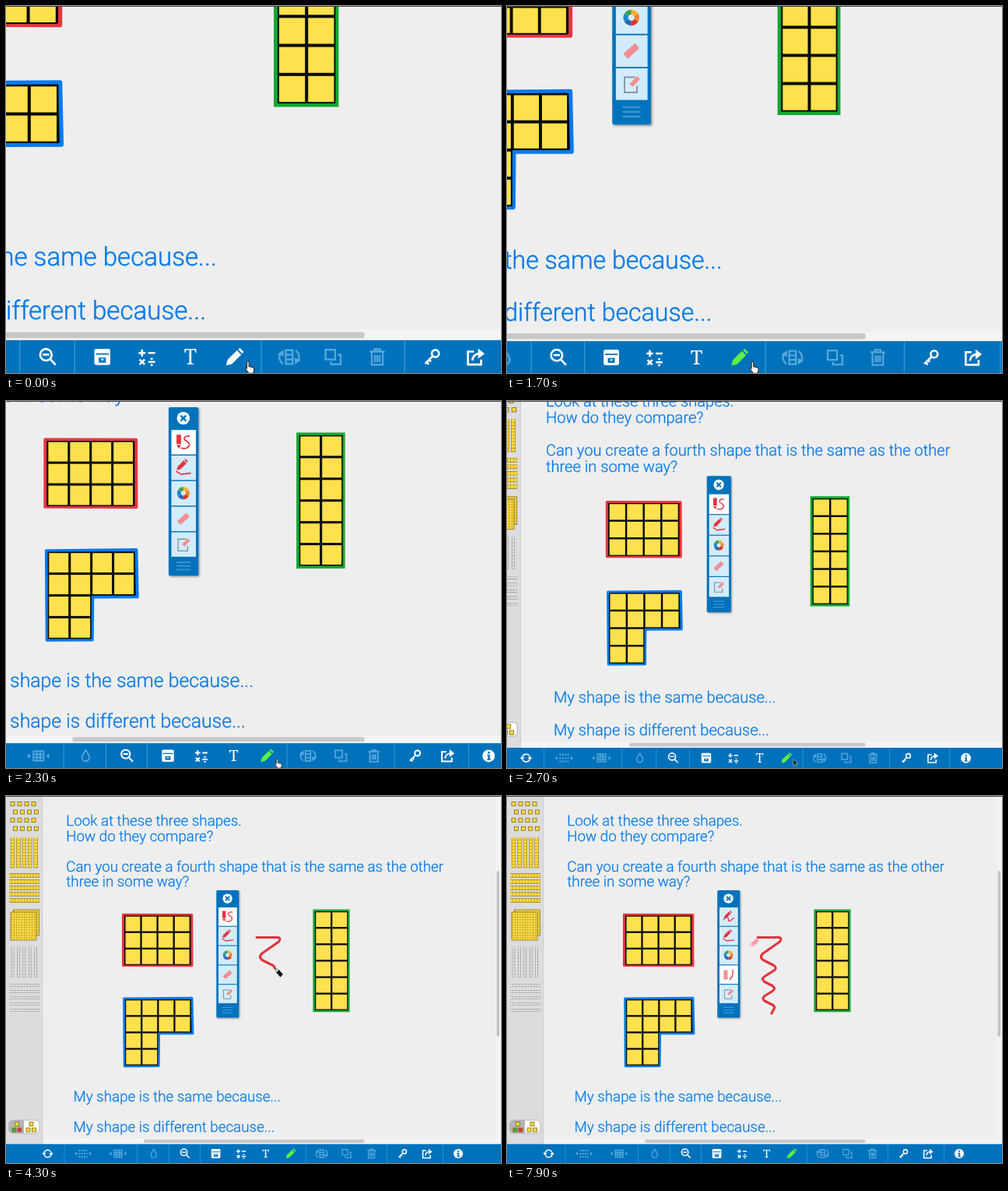
An HTML page for the animation above (8 s loop, 636 by 471 pixels).

```html
<!DOCTYPE html>
<html lang="en">
<head>
<meta charset="utf-8">
<title>Shape whiteboard</title>
<style>
  html, body { margin: 0; width: 100%; height: 100%; overflow: hidden; background: #eee; }
  svg { display: block; width: 636px; height: 471px; }
  .copy { font: 300 18.75px Roboto, sans-serif; fill: #0078ea; stroke: #0078ea; stroke-width: .25; text-rendering: geometricPrecision; }
  .line { fill: none; stroke: #fff; stroke-width: 1.5; }
  .solid { fill: #fff; }
  .dim .line { stroke: #58a8dc; stroke-width: 1.3; }
  .dim .solid { fill: #58a8dc; }
  .red { fill: #e3343f; }
  .redline { fill: none; stroke: #e3343f; stroke-width: 1.3; stroke-linecap: round; stroke-linejoin: round; }
  .pink { fill: #f58e94; }
</style>
</head>
<body>
<svg viewBox="0 0 636 471">
  <defs>
    <pattern id="mesh" width="3.3" height="3.3" patternUnits="userSpaceOnUse">
      <rect width="3.3" height="3.3" fill="#ffdf45"/>
      <path d="M0 0H3.3M0 0V3.3" stroke="#a58a1c" stroke-width=".9"/>
    </pattern>
    <filter id="shade" x="-20%" y="-5%" width="150%" height="115%">
      <feDropShadow dx="1" dy="1" stdDeviation="1" flood-opacity=".4"/>
    </filter>
    <path id="pencil" d="M-5.9 5.9l1-4.1 7-7 3.2 3.2-7 7zM2.9-5.9l.8-.7q.5-.3 1 0l2 2q.4.6 0 1l-.7.8z"/>
  </defs>

  <g id="world">
    <rect x="629" width="8" height="447" fill="#f3f3f4"/>
    <rect x="47" y="439.4" width="590" height="9" fill="#f4f4f5"/>
    <rect x="177" y="440.8" width="283.5" height="4.4" rx="2" fill="#c8c8c8"/>
    <rect x="630.3" y="96" width="3.8" height="213" rx="1.9" fill="#c6c6c6"/>

    <g id="side"></g>

    <g class="copy">
      <text x="77.3" y="38">Look at these three shapes.</text>
      <text x="77.3" y="57.5">How do they compare?</text>
      <text x="77.3" y="96.5">Can you create a fourth shape that is the same as the other</text>
      <text x="77.3" y="116">three in some way?</text>
      <text x="86.6" y="392.3">My shape is the same because...</text>
      <text x="86.6" y="431.3">My shape is different because...</text>
    </g>

    <g fill="#0a0a05" stroke-width="2.9" stroke-linejoin="round">
      <path stroke="#ea3541" d="M150.4 152.2L238.8 152.4L239 217.8L150.4 217.6z"/>
      <path stroke="#12a733" stroke-linejoin="miter" d="M395.8 146.9H440.1V275.8H395.8z"/>
      <path stroke="#077aee" d="M151.6 260L239 259.2L240 304.8L196.6 304.9L196.2 346.6L152.2 346.8z"/>
    </g>
    <g id="shapes"></g>

    <path id="ink" fill="none" stroke="#e2343e" stroke-width="3.1" stroke-linecap="round" stroke-linejoin="round"
      d="M322 181.5L349 181.5Q354 182 350.5 187L329 202Q323.5 207 330 211L343 217.5Q347.5 220.5 343 224L331 231.5Q326 235 331 238.5L341 243.5Q346 247 341 250.5L332 256Q326.5 259.5 331 263L342 268.5Q345 271 342.5 274L340 279"/>

    <g id="panel">
      <rect x="270.3" y="121" width="29" height="163.4" rx="1.5" fill="#0072bc" filter="url(#shade)"/>
      <circle cx="284.6" cy="131.6" r="6.2" fill="#fff"/>
      <path d="M282 129l5.2 5.2m0-5.2l-5.2 5.2" stroke="#0072bc" stroke-width="1.8"/>
      <g id="buttons"></g>
      <g id="drawOn">
        <path class="red" d="M278 147.5h4.4v9.2h-4.4zM278 157.5h4.4l-2.2 3.6z"/>
        <path class="redline" d="M290.5 149c-5-.6-6.4 2.6-3.6 4.3 3 1.7 4.5 3.2 3 5.6-1.6 2.4-5 2.3-7 1.6"/>
      </g>
      <g id="drawOff">
        <use href="#pencil" class="red" transform="translate(283.4 152.6) scale(.8)"/>
        <path class="redline" d="M278.5 158.5c2-3 4.5-4 5.5-2s-.5 4.5 2 4 3-4 5.5-3.5"/>
      </g>
      <use href="#pencil" class="red" transform="translate(283.2 177) scale(.85)"/>
      <path class="redline" d="M278 183.2l4.5 2.8 9-1.2"/>
      <g id="wheel" fill="none" stroke-width="3.6"></g>
      <rect id="eraseOff" class="pink" x="-6" y="-2.5" width="12" height="5" rx=".5" transform="translate(284.6 229.2) rotate(-42)"/>
      <g id="eraseOn">
        <rect class="pink" x="278.5" y="223.5" width="5" height="12" rx=".4"/>
        <path class="redline" d="M290.2 223.5c.4 4 0 8.5-3.6 11.5"/>
      </g>
      <path d="M287.5 248.8H279.5V260.2H288.8V255.5" fill="none" stroke="#7d8da0"/>
      <rect class="pink" x="-4" y="-1.6" width="8" height="3.2" transform="translate(287.3 252) rotate(-45)"/>
      <path d="M278 271.3h13.4m-13.4 3.5h13.4m-13.4 3.5h13.4" stroke="#3f97d5" stroke-width="1.3"/>
    </g>

    <rect x="-2" y="446.7" width="640" height="32" fill="#0072bc"/>
    <g id="rules" stroke="#3a94d1" stroke-width=".8"></g>

    <g transform="translate(53.5 459)">
      <path class="line" d="M-4.6-.8A4.700 4.700 0 0 1 4-2.4M4.6.8A4.700 4.700 0 0 1-4 2.4"/>
      <path class="solid" d="M-7.3-1h5.4l-2.7 3.5zM7.3 1H1.9l2.7-3.5z"/>
    </g>
    <g class="dim">
      <g transform="translate(99 459)">
        <path class="line" stroke-dasharray="2 1.3" d="M-5.6-4H5.6M-5.6 0H5.6M-5.6 4H5.6" style="stroke-width:2"/>
        <path class="solid" d="M-11 0l3-2.4v4.8zM11 0L8-2.4v4.8z"/>
      </g>
      <g transform="translate(144 459)">
        <path class="line" d="M-5-4.6H5V4.6H-5zM-5-1.5H5M-5 1.5H5M-1.7-4.6V4.6M1.7-4.6V4.6"/>
        <path class="solid" d="M-7.3 0l-3-2.4v4.8zM7.3 0l3-2.4v4.8z"/>
      </g>
      <path class="line" d="M189.8 453.3c2.4 3.5 3.6 5.3 3.6 7.3a3.6 3.6 0 0 1-7.2 0c0-2 1.2-3.8 3.6-7.3z"/>
      <g transform="translate(405.6 459)">
        <path class="line" d="M-2.5-5H2.5V5H-2.5zM-2.5-1.7H2.5M-2.5 1.7H2.5M-4.7 5Q-8.6 1.5-6.4-3M4.7-5Q8.6-1.5 6.4 3"/>
        <path class="solid" d="M-8.4-2L-4.2-5.4-4-.6zM8.4 2L4.2 5.4 4 .6z"/>
      </g>
      <path class="line" d="M432 453.7h7v7h-7zM441 457.3h2v7h-7v-2"/>
      <path class="line" d="M464.1 455h11M467.600 455v-1.8h4V455M465.600 455.500v9.100h8v-9.100M467.900 457.500v5.100M469.600 457.500v5.100M471.300 457.500v5.100"/>
    </g>
    <path class="line" d="M226.2 457.2h4.800M231.8 460.6l3.8 4"/>
    <circle class="line" cx="228.6" cy="457.3" r="4.2"/>
    <rect class="solid" x="263.8" y="453" width="11.6" height="11.8" rx="1.4"/>
    <path d="M264.8 456.2h9.6v1h-9.6zM267 459.4h5.200v3.600h-5.200z" fill="#0072bc"/>
    <path class="solid" d="M268.3 460.300h2.600l-1.300 1.500z"/>
    <path class="line" d="M296 456h5M298.500 453.500v5M303 456h5M296.700 460.700l3.700 3.700m0-3.700l-3.700 3.700M303 462.500h5"/>
    <path class="solid" d="M304.700 459.500h1.600v1.500h-1.600zM304.700 464h1.600v1.500h-1.600z"/>
    <text x="333.6" y="464.2" text-anchor="middle" fill="#fff" style="font:500 15px 'Noto Serif', serif">T</text>
    <use id="tool" href="#pencil" transform="translate(365.5 459.2) scale(.98)"/>
    <g transform="translate(509.5 459)">
      <circle class="line" cx="2.4" cy="-2.6" r="2.6"/>
      <path class="line" d="M.5-.7L-5 4.8M-4.4 3.3l2 2M-2.4 1.7l1.6 1.6"/>
    </g>
    <path class="line" d="M540 455h-4.4v9.4h9.6v-3.6M538.8 461.5c.4-3.6 2.2-4.8 5.2-5"/>
    <path class="solid" d="M543 452.7l4.7 3.8-4.700 3.800z"/>
    <circle class="solid" cx="581" cy="459" r="6"/>
    <path fill="#0072bc" d="M580.2 454.8h2v1.9h-2zM579.5 457.7h2.7v4.3h.8v1.2h-3.5v-1.2h.8v-3.1h-.8z"/>

    <g id="cursor">
      <path data-kind="hand" fill="#fff" stroke="#333" stroke-width=".7"
        d="M1.9.4c.7 0 1 .5 1 1.1v2.7l2.6.6c1 .3 1.3.7 1.2 1.6L6.1 9.200H2.700L.5 6.200c-.5-.9.3-1.300.9-.7V1.500c0-.6.1-1.100.5-1.100z"/>
      <path data-kind="arrow" fill="#111" stroke="#fff" stroke-width=".4" d="M0 0l5 5.2-2.3.2 1.2 2.8-1.1.5-1.2-2.8L0 7.4z"/>
      <g data-kind="pen" stroke="#222" stroke-width=".7" stroke-linejoin="round">
        <path fill="#fff" d="M0 0l5.6 2.8-3 3.2z"/>
        <path fill="#111" d="M5.6 2.8l4.7 5.2-3 3.4L2.6 6z"/>
      </g>
      <g data-kind="rubber" transform="translate(5.6 5.5) rotate(-42)">
        <rect x="-6" y="-2.4" width="12" height="4.8" rx=".6" fill="#f59a9e"/>
        <rect x="-6" y="-2.4" width="3.4" height="4.8" rx=".6" fill="#f9c3c4"/>
      </g>
    </g>
  </g>
  <rect width="636" height="1" fill="#48484a"/>
</svg>

<script>
const $ = id => document.getElementById(id);
const fill = (id, parts) => { $(id).innerHTML = parts.flat(3).join(''); };
const range = n => [...Array(n).keys()];
const rect = (x, y, w, h, paint, extra = '') =>
  `<rect x="${x}" y="${y}" width="${w}" height="${h}" fill="${paint}" ${extra}/>`;

// Yellow squares on black
const PITCH = 21.1;
const grid = (x, y, cols, rows) => [
  rect(x, y, cols * PITCH, rows * PITCH, '#0a0a05'),
  range(rows).map(r => range(cols).map(c =>
    rect(x + c * PITCH + 1.15, y + r * PITCH + 1.15, PITCH - 2.3, PITCH - 2.3, '#ffe14d')))
];
fill('shapes', [
  grid(152.4, 153.6, 4, 3), grid(397.1, 148.1, 2, 6),
  grid(153.1, 261.2, 4, 2), grid(153.1, 261.2 + 2 * PITCH, 2, 2)
]);

// Sidebar blocks
const cube = (x, y, paint = '#ffdb3a', size = 5) =>
  rect(x, y, size, size, paint, 'stroke="#7d6a1c" stroke-width=".8"');
const rod = (d, edge, body, width) =>
  `<path d="${d}" stroke="${edge}" stroke-width="${width}"/>` +
  `<path d="${d}" stroke="${body}" stroke-width="${width - 1.2}" stroke-dasharray="3.4 .5"/>`;
const rods = (top, left, edge, body, width) => range(5).map(i => [
  rod(`M${8.5 + i * 7.4} ${top}v39.5`, edge, body, width),
  rod(`M4 ${left + i * 8}h39`, edge, body, width)
]);
const outline = 'stroke="#8a7320" stroke-width=".8"';
fill('side', [
  rect(-2, 0, 49, 447, '#dcdcde'), rect(46.4, 0, .8, 447, '#c9c9cc'),
  [6, 9.5, 6, 9.5].map((x, r) => range(4).map(c => cube(x + c * 9, 7.5 + r * 10.6))),
  rods(53, 102, '#8f7a22', '#ffdb3a', 5.4),
  rect(9.5, 146, 33, 33, 'url(#mesh)', outline),
  rect(6, 149, 33, 36, 'url(#mesh)', outline),
  rods(193.5, 243, '#98989b', '#e4e4e6', 3.6),
  rect(3.5, 416, 39.5, 17, '#fafafa', 'rx="5" stroke="#aaa" stroke-width=".8"'),
  '<path d="M23 416H8.5a5 5 0 0 0-5 5v7a5 5 0 0 0 5 5H23z" fill="#b4b4b6"/>',
  cube(11.5, 418.5), cube(8, 426, '#3dae49'), cube(15, 426, '#e3343f'),
  cube(30, 418.5), cube(26, 426), cube(33.5, 426)
]);

fill('buttons', range(5).map(i => rect(273, 143 + i * 24.8, 23.8, 23.7, '#d3ecfb')));
fill('rules', [75, 168.5, 209.5, 249.5, 385.3, 489.5, 561.5].map(x => `<path d="M${x} 447v32"/>`));
fill('wheel', ['#fbb034', '#f58220', '#d9362f', '#2864b4', '#1f86c8', '#3f9f5f'].map((c, i) =>
  `<path d="M0-4.2A4.2 4.2 0 0 1 3.64-2.1" stroke="${c}" transform="translate(284.6 204.2) rotate(${i * 60})"/>`));

// Timing
const part = (t, a, b) => Math.min(1, Math.max(0, (t - a) / (b - a)));
const smooth = u => u * u * (3 - 2 * u);
const mix = (a, b, u) => a + (b - a) * u;

const ink = $('ink'), inkLength = ink.getTotalLength();
const kinds = [...document.querySelectorAll('[data-kind]')];
const buttons = $('buttons').children;
const show = (el, on) => { el.style.display = on ? '' : 'none'; };

// Waypoints: time, x, y
const approach = [[2600, 373.4, 461.6], [2700, 374, 460.5], [3200, 339, 271], [3400, 323, 182], [3500, 322, 181.5]];

function pointer(t) {
  if (t < 3500) {
    const next = Math.max(1, approach.findIndex(k => k[0] > t));
    const [t0, x0, y0] = approach[next - 1], [t1, x1, y1] = approach[next];
    const u = part(t, t0, t1);
    const kind = t < 2700 ? 'hand' : t < 2800 ? 'arrow' : 'pen';
    return [kind, mix(x0, x1, u), mix(y0, y1, u)];
  }
  if (t < 5500) {
    const p = ink.getPointAtLength(inkLength * part(t, 3500, 5100));
    return ['pen', p.x, p.y];
  }
  const back = smooth(part(t, 5500, 6700)), out = part(t, 7300, 7900);
  const x = mix(mix(340, 277.5, back), 312, out), y = mix(mix(279, 227.5, back), 183, out);
  return [x < 300 ? 'hand' : t < 7000 ? 'pen' : 'rubber', x, y];
}

function draw(t) {
  const zoom = mix(1.766, 1, smooth(part(t, 1450, 2990)));
  $('world').setAttribute('transform', `translate(460 470) scale(${zoom}) translate(-460 -470)`);

  $('tool').setAttribute('fill', t < 1100 ? '#fff' : t < 1300 ? '#a5f595' : '#5cf03f');
  show($('panel'), t >= 1300);

  const erasing = t >= 7100;
  show($('drawOn'), !erasing);
  show($('drawOff'), erasing);
  show($('eraseOn'), erasing);
  show($('eraseOff'), !erasing);
  buttons[0].setAttribute('fill', erasing ? '#d3ecfb' : '#fff');
  buttons[3].setAttribute('fill', erasing ? '#fff' : '#d3ecfb');

  show(ink, t > 3500);
  ink.style.strokeDasharray = `${inkLength * part(t, 3500, 5100)} ${inkLength + 9}`;

  const [kind, x, y] = pointer(t);
  $('cursor').setAttribute('transform', `translate(${x} ${y})`);
  kinds.forEach(el => show(el, el.dataset.kind === kind));
}

// The picture advances ten times a second
function tick() {
  draw(Math.floor(performance.now() % 8000 / 100) * 100);
  requestAnimationFrame(tick);
}
tick();
</script>
</body>
</html>
```
